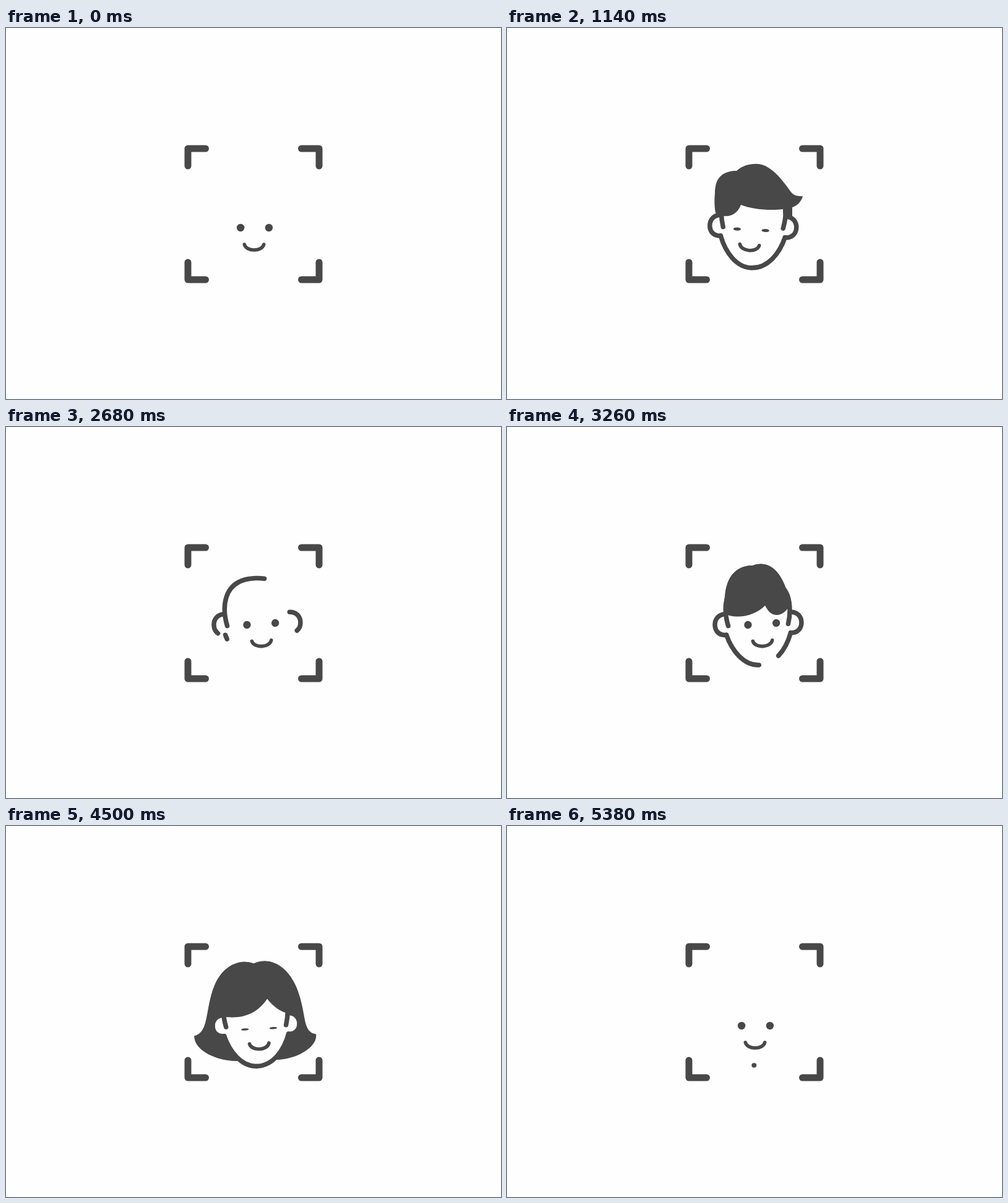
These frames come from a looping animation (800 by 600 pixels, 5400 ms). An HTML page:

```html
<!DOCTYPE html>
<html lang="en">
<head>
<meta charset="utf-8">
<title>Face scan</title>
<style>
  html, body { margin: 0; width: 100%; height: 100%; overflow: hidden; background: #fefefe; }
  svg { display: block; width: 100vw; height: 100vh; }
  .line { fill: none; stroke: #484848; stroke-width: 7.5; stroke-linecap: round; stroke-linejoin: round; }
  .ink { fill: #484848; }
  .skin { fill: #fefefe; }
</style>
</head>
<body>
<svg viewBox="0 0 800 600">
  <path class="line" stroke-width="11" style="stroke-width:11"
    d="M294,223V195H322.5M477.5,195H506V223M294,379V407H322.5M506,379V407H477.5"/>
  <path class="ink" id="locks"/>
  <g id="head">
    <path class="skin" d="M-53,-19C-64,-19 -70,-11 -70,-2C-70,9 -62,15.5 -52,14.5C-44,40 -26,65 0,65C26,65 44,40 52,14.5C62,15.5 70,9 70,-2C70,-11 64,-19 53,-19C53,-50 40,-75 0,-75C-40,-75 -53,-50 -53,-19Z"/>
    <path class="line" id="skull" pathLength="1" d="M-48.5,0C-55,-25 -57,-75.5 0,-75.5C57,-75.5 55,-25 48.5,0"/>
    <path class="line" id="earL" pathLength="1" d="M-53,-19C-64,-19 -70,-11 -70,-2C-70,9 -62,15.5 -52,14.5"/>
    <path class="line" id="earR" pathLength="1" d="M53,-19C64,-19 70,-11 70,-2C70,9 62,15.5 52,14.5"/>
    <path class="line" id="jawL" pathLength="1" d="M-52,14.5C-44,40 -26,65 -1,65"/>
    <path class="line" id="jawR" pathLength="1" d="M52,14.5C44,40 26,65 -1,65"/>
  </g>
  <g id="eyes"><ellipse class="ink" cx="-22.9" rx="6.2"/><ellipse class="ink" cx="22.9" rx="6.2"/></g>
  <path class="line" id="mouth" style="stroke-width:5.6" d="M-15.7,0C-13,12 13,12 15.7,0"/>
  <path class="ink" id="quiff"/>
  <path class="ink" id="bob"/>
</svg>
<script>
const LOOP = 5400;
const el = Object.fromEntries([...document.querySelectorAll('[id]')].map(e => [e.id, e]));

const quiff = {
  seed: 'M370,242C366,242 362,245 362,248C362,250 363,254 364,257C366,264 370,271 375,273C377,274 379,274 380,273C380,273 380,273 380,272C379,271 378,270 378,269C378,268 378,267 378,266C380,264 382,260 382,256C382,254 382,252 382,250C381,247 380,245 378,244C376,242 373,241 370,242Z',
  full: 'M371,228C350,228 336,238 336,264C335,275 335,285 337,296C350,305 370,304 378,283C395,290 425,293 446,290C446,294 446,297 447,300C452,302 457,302 461,301C461,296 461,291 461,287C468,285 476,278 478,269C468,269 463,268 458,261C447,246 432,224 412,218C400,215 383,217 371,228Z'
};
const bob = {
  cap: 'M397,224C380,224 358,232 353,268C352,280 350,290 352,297C353,302 357,304 360,305C382,310 404,302 417,289C424,305 439,311 453,294C456,294 458,294 459,292C460,282 458,270 450,260C442,236 424,214 397,224Z',
  full: 'M402,219C382,211 350,220 336,262C332,275 329,290 327,306C333,307 340,303 345,303C378,311 406,303 424,276C434,289 447,298 460,300C470,300 475,301 480,299C478,285 476,270 473,262C458,222 428,207 402,219Z'
};
const locks = [
  'M397,224C380,224 358,232 353,268C352,280 351,290 352,295C352,297 370,300 378,300L438,300C446,300 458,297 459,292C460,285 458,270 450,260C442,236 424,214 397,224Z',
  'M400,220C380,212 352,222 338,262C328,297 318,318 306,322C312,345 340,366 378,368L430,366C450,364 474,350 477,332C476,318 478,300 470,264C456,222 428,208 400,220Z',
  'M402,219C382,211 350,220 336,262C324,297 320,332 294,338C296,368 348,387 378,385L440,381C470,380 508,362 504,338C480,332 488,300 473,262C458,222 428,207 402,219Z',
  'M402,219C382,211 350,220 336,262C324,297 329,331 306,336C306,362 348,378 378,376.5L440,374.5C470,374 506,355 503,333C480,330 488,300 473,262C458,222 428,207 402,219Z'
];

// Eased value through time, value pairs
function track(t, ...keys) {
  if (t <= keys[0]) return keys[1];
  for (let i = 2; i < keys.length; i += 2) {
    if (t < keys[i]) {
      const k = (t - keys[i - 2]) / (keys[i] - keys[i - 2]);
      return keys[i - 1] + (keys[i + 1] - keys[i - 1]) * k * k * (3 - 2 * k);
    }
  }
  return keys[keys.length - 1];
}

function morph(a, b, k) {
  const to = b.match(/-?[\d.]+/g);
  let i = 0;
  return a.replace(/-?[\d.]+/g, n => (+n + (to[i++] - n) * k).toFixed(2));
}

function trim(line, from, to) {
  const len = to - from;
  line.style.display = len > 0.0005 ? '' : 'none';
  line.setAttribute('stroke-dasharray', `${Math.max(len, 0)} 2`);
  line.setAttribute('stroke-dashoffset', -from);
}

const place = (node, x, y, turn) =>
  node.setAttribute('transform', `translate(${x} ${y}) rotate(${turn})`);

function grow(node, d, scale, head, rest, seed) {
  node.style.display = scale > 0.01 ? '' : 'none';
  node.setAttribute('d', d);
  node.setAttribute('transform',
    `translate(${head.x} ${head.y}) rotate(${head.turn - rest.turn}) translate(${-rest.x} -320) ` +
    `translate(${seed}) scale(${scale}) translate(${seed.map(v => -v)})`);
}

function draw(t) {
  // side: -1 turned left, 0 facing front, 1 turned right
  const side = track(t, 580, 0, 940, -1, 2230, -1, 2600, 1, 4580, 1, 4880, 0);
  const dip = track(t, 940, 0, 1090, 1, 1260, 0, 1840, 0, 1980, 1, 2040, 1, 2310, 0,
    4340, 0, 4530, 1, 4580, 1, 4800, 0);
  const right = Math.max(side, 0), left = Math.max(-side, 0), m = right + left;
  const pose = (mid, l, r) => mid + l * left + r * right;

  const head = {
    x: pose(400.5, -2.8, 5.5) - 2 * dip * right,
    y: 322 - 2 * m + 3.7 * dip,
    turn: pose(0, 1.5, -2)
  };
  place(el.head, head.x, head.y, head.turn);
  place(el.eyes, pose(402, -7.2, 10.3) - 3.5 * dip * right, 323 - 4.5 * m + 10 * dip, pose(0, 3.1, -3.7 + dip));
  for (const e of el.eyes.children) e.setAttribute('ry', 6.2 - 4.7 * dip);
  place(el.mouth, pose(401, -9, 12) - 4 * dip * right, 350 - 4.4 * m + 6.5 * dip, pose(0, 4, -2.7));

  // Outline: each line runs from its start mark to its end mark
  const second = t >= 2400;
  const ear = second
    ? [track(t, 4880, 0, 5200, 1), track(t, 2460, 0, 2780, 1)]
    : [track(t, 1980, 0, 2380, 1), track(t, 80, 0, 400, 1)];
  trim(el.earL, ...ear);
  trim(el.earR, ...ear);
  trim(el.skull, 0, second
    ? track(t, 2420, 0, 2900, 1, 4880, 1, 5300, 0)
    : track(t, 40, 0, 540, 1, 1980, 1, 2380, 0));
  if (second) {
    trim(el.jawL, track(t, 4940, 0, 5400, 1), track(t, 2620, 0, 2940, 1));
    trim(el.jawR, track(t, 4900, 0, 5320, 1), track(t, 3060, 0, 3440, 1));
  } else {
    trim(el.jawL, track(t, 1980, 0, 2240, 1), track(t, 380, 0, 820, 1));
    trim(el.jawR, 0, track(t, 420, 0, 860, 1, 2180, 1, 2380, 0));
  }

  const man = { x: 397.7, turn: 1.5 }, woman = { x: 406, turn: -2 };
  grow(el.quiff,
    morph(quiff.seed, quiff.full, track(t, 700, 0, 1000, 1.04, 1120, 1, 1960, 1, 2180, 0)),
    track(t, 610, 0, 740, 1, 2170, 1, 2310, 0), head, man, [371, 246]);

  const size = track(t, 2960, 0, 3220, 1, 4740, 1, 4880, 0);
  grow(el.bob,
    morph(bob.cap, bob.full, track(t, 3230, 0, 3580, 1, 4580, 1, 4780, 0)),
    size, head, woman, [400, 246]);

  const stage = track(t, 3260, 0, 3500, 1, 3640, 2, 3810, 3);
  const i = Math.min(Math.floor(stage), 2);
  const d = t < 4500
    ? morph(locks[i], locks[i + 1], stage - i)
    : morph(locks[0], locks[3], track(t, 4570, 1, 4780, 0));
  grow(el.locks, d, size, head, woman, [400, 246]);
}

const start = performance.now();
function tick() {
  draw((performance.now() - start) % LOOP);
  requestAnimationFrame(tick);
}
tick();
</script>
</body>
</html>
```
